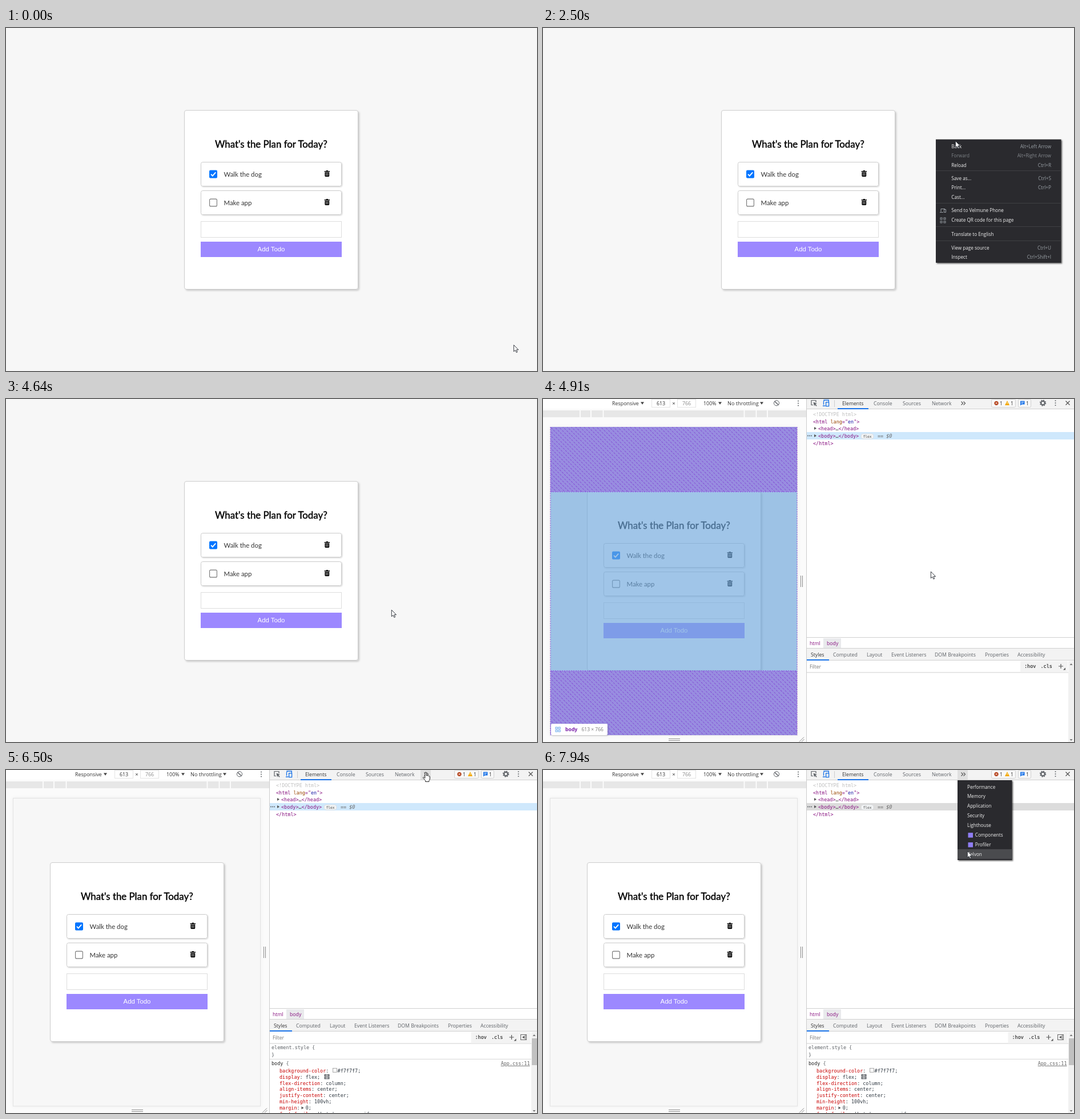
Write an HTML page that moves like this. It is 930 by 602 pixels and loops after 8 s.

```html
<!DOCTYPE html>
<html lang="en">
<head>
<meta charset="utf-8">
<title>Todo app and inspector</title>
<style>
html, body { margin: 0; width: 100%; height: 100%; overflow: hidden; background: #f7f7f7; }
svg { display: block; width: 930px; height: 602px; }
text { white-space: pre; }
.app { font-family: Lato, sans-serif; }
.ui { font-family: "Open Sans", "Noto Sans", sans-serif; }
.code { font-family: "DejaVu Sans Mono", monospace; font-size: 8.45px; }
</style>
</head>
<body>
<svg id="stage" viewBox="0 0 930 602" xmlns="http://www.w3.org/2000/svg"></svg>
<script>
const LOOP = 8000;
const MENU_IN = 1820, MENU_OUT = 4230, TOOLS_IN = 4780, STYLES_IN = 5120, OVERLAY_OUT = 5410, MORE_IN = 6770;

const rect = (x, y, w, h, fill, more = '') =>
  `<rect x="${x}" y="${y}" width="${w}" height="${h}" fill="${fill}" ${more}/>`;
const path = (d, stroke, more = '') => `<path d="${d}" fill="none" stroke="${stroke}" ${more}/>`;
const fillPath = (d, fill, more = '') => `<path d="${d}" fill="${fill}" ${more}/>`;
const label = (x, y, s, size, fill, more = '') =>
  `<text class="ui" x="${x}" y="${y}" font-size="${size}" fill="${fill}" ${more}>${s}</text>`;
const esc = s => s.replace(/</g, '&lt;').replace(/>/g, '&gt;');
// parts: text, colour, text, colour ...
const code = (x, y, ...parts) => {
  let s = '';
  for (let i = 0; i < parts.length; i += 2) s += `<tspan fill="${parts[i + 1]}">${esc(parts[i])}</tspan>`;
  return `<text class="code" x="${x}" y="${y}">${s}</text>`;
};
const group = (id, body, more = '') => `<g id="${id}" ${more}>${body}</g>`;
const END = 'text-anchor="end"', MID = 'text-anchor="middle"';

function trash(x, y) {
  return fillPath(`M${x} ${y + 1}h3v-1h3.4v1h3v1.6h-9.4z`, '#000') +
    fillPath(`M${x + .8} ${y + 3.2}h7.8v6.4q0 1.4-1.4 1.4h-5q-1.4 0-1.4-1.4z`, '#000') +
    path(`M${x + 2.9} ${y + 4.4}v5M${x + 4.7} ${y + 4.4}v5M${x + 6.5} ${y + 4.4}v5`, '#fff', 'stroke-width=".6"');
}

function todo(y, name, done) {
  const box = done
    ? rect(356, y + 14.5, 14, 14, '#0075ff', 'rx="2"') +
      path(`M359 ${y + 21.7}l2.8 2.8 5.4-6.2`, '#fff', 'stroke-width="1.9"')
    : rect(356.6, y + 15.1, 12.8, 12.8, '#fff', 'rx="2" stroke="#767676" stroke-width="1.1"');
  return rect(341.5, y + .5, 246, 42, '#fff', 'rx="3" stroke="#ccc" filter="url(#soft)"') + box +
    `<text class="app" x="381.5" y="${y + 26.4}" font-size="11.4" fill="#333">${name}</text>` +
    trash(557.6, y + 15);
}

const app =
  rect(312.5, 144.5, 304, 314, '#fff', 'rx="3.5" stroke="#ccc" filter="url(#shade)"') +
  `<text class="app" x="464.3" y="210.4" font-size="16.85" fill="#000" stroke="#000" stroke-width=".4" ${MID}>What's the Plan for Today?</text>` +
  todo(235, 'Walk the dog', true) + todo(285, 'Make app', false) +
  rect(341.5, 339.5, 246, 28, '#fff', 'stroke="#ddd"') +
  rect(341, 375, 247, 27, '#9c88ff') +
  `<text x="464.5" y="391.5" font-family="Liberation Sans, Arial, sans-serif" font-size="11.4" fill="#fff" ${MID}>Add Todo</text>`;

// Page menu: top, height, name, shortcut, disabled
const pageRows = [
  [199, 17, 'Back', 'Alt+Left Arrow'], [216, 16, 'Forward', 'Alt+Right Arrow', true], [232, 17, 'Reload', 'Ctrl+R'],
  [256, 16, 'Save as...', 'Ctrl+S'], [272, 16, 'Print...', 'Ctrl+P'], [288, 17, 'Cast...', ''],
  [312, 16, 'Send to Velmune Phone', ''], [328, 18, 'Create QR code for this page', ''],
  [353, 17, 'Translate to English', ''], [378, 16, 'View page source', 'Ctrl+U'], [394, 16, 'Inspect', 'Ctrl+Shift+I']
];

function pageMenu() {
  const grid = [[696, 333], [702, 333], [696, 339], [702, 339]]
    .map(([x, y]) => rect(x, y, 3, 3, 'none', 'stroke="#9aa0a6" stroke-width=".9"')).join('');
  return rect(688, 195.5, 219.5, 216.5, '#292a2d', 'filter="url(#drop)"') +
    rect(688, 0, 219.5, 16, '#4a4b4e', 'id="pageHover"') +
    [250.5, 307.5, 348.5, 373.5].map(y => rect(688, y - .5, 219.5, 1, '#3f4043')).join('') +
    pageRows.map(([y, h, name, keys, off]) => {
      const base = y + h / 2 + 3;
      return label(715.3, base, name, 8.2, off ? '#7c8085' : '#f1f1f1') +
        label(890, base, keys, 8.2, off ? '#85898e' : '#9aa0a6', END);
    }).join('') +
    path('M697 322.5v-5h7M695 323.5h6M702.5 318.5h3v5h-3z', '#9aa0a6') + grid;
}

// Tab overflow menu
const moreRows = ['Performance', 'Memory', 'Application', 'Security', 'Lighthouse', 'Components', 'Profiler', 'Belvon'];
function moreMenu() {
  return rect(726, 18, 95.5, 140, '#292a2d', 'filter="url(#drop)"') +
    rect(726, 0, 95.5, 17, '#4a4b4e', 'id="moreHover"') +
    moreRows.map((s, i) => {
      const y = 32.5 + 16.93 * i, icon = i === 5 || i === 6;
      return (icon ? rect(744.5, y - 7, 8.5, 8.5, '#8f7df2') : '') + label(icon ? 756.8 : 743, y, s, 8.15, '#f1f1f1');
    }).join('');
}

const TAG = '#881280', GREY = '#5f6368', DARK = '#333';
const caret = (x, y) => fillPath(`M${x} ${y}h6l-3 4.5z`, '#444');
const tri = (x, y) => fillPath(`M${x} ${y}v5l4-2.5z`, '#555');
const dots = (x, y, dx, dy, r) =>
  [-1, 0, 1].map(i => `<circle cx="${x + i * dx}" cy="${y + i * dy}" r="${r}" fill="${GREY}"/>`).join('');

function deviceBar() {
  return rect(0, 0, 461, 602, '#fbfbfb') + rect(0, 0, 461, 17, '#fff') +
    label(121, 11, 'Responsive', 8.9, DARK) + caret(171, 5.3) +
    rect(190.5, .5, 32, 14, '#fff', 'stroke="#e4e4e4"') + label(206.5, 11, '613', 8.9, DARK, MID) +
    label(229, 11.3, '×', 9.5, DARK, MID) +
    rect(235.5, .5, 32, 14, '#fff', 'stroke="#e4e4e4"') + label(251.5, 11, '766', 8.9, '#888', MID) +
    label(281, 11, '100%', 8.9, DARK) + caret(307, 5.3) +
    label(323, 11, 'No throttling', 9.2, DARK) + caret(380, 5.3) +
    '<circle cx="409" cy="7.2" r="4.6" fill="none" stroke="#5f6368"/>' + path('M405.5 4l7 6.5', GREY, 'stroke-width="1.6"') + dots(447, 7.5, 0, 4, 1) +
    rect(0, 20, 461, 12, '#e7e7e7') + path('M65 20v12M84 20v12M105.5 20v12M352.5 20v12M373.5 20v12M393 20v12', '#fff', 'stroke-width="1.6"') +
    rect(12.5, 49.5, 433, 540.5, '#f7f7f7', 'stroke="#e2e2e2" filter="url(#glow)"') +
    path('M451.5 310v20M454.5 310v20M220 596.5h20M220 599.5h20', '#8b8b8b') +
    path('M449 601.5l8-8M453 601.5l4.5-4.5', '#8b8b8b');
}

function panel() {
  const tabs = [[524, 'Elements'], [579, 'Console'], [630, 'Sources'], [681, 'Network']];
  const side = [[469, 'Styles'], [508, 'Computed'], [567, 'Layout'], [610, 'Event Listeners'],
    [686, 'DOM Breakpoints'], [774, 'Properties'], [831, 'Accessibility']];
  return rect(461, 0, 469, 602, '#fff') + rect(461, 0, 1, 602, '#ccc') + rect(462, 0, 468, 17, '#f3f3f3') +
    rect(462, 17, 468, 1, '#d0d0d0') +
    path('M478 6v-3.5h-8v8h3', GREY, 'stroke-width="1.2"') + fillPath('M473.5 5.5l6.5 2.6-2.7 1 2.4 2.6-1 1-2.6-2.5-1 2.4z', GREY) +
    path('M492 4v-2h8.3v3M490 12h4.5M491.5 10v-6', '#1a73e8', 'stroke-width="1.3"') +
    rect(495.6, 5.6, 5, 7, '#f3f3f3', 'stroke="#1a73e8" stroke-width="1.3"') + rect(510, 2, 1, 12, '#ccc') +
    tabs.map(([x, s], i) => label(x, 11, s, 8.7, i ? GREY : DARK)).join('') + rect(516, 16, 54, 2, '#1a73e8') +
    rect(726, 0, 18, 17, '#e0e0e0', 'id="moreTab"') + path('M732.5 4.5l3 3-3 3M736.5 4.5l3 3-3 3', '#555', 'stroke-width="1.2"') +
    rect(785.5, .5, 42, 14, '#f8f8f8', 'rx="2" stroke="#d0d0d0"') +
    '<circle cx="794" cy="7.3" r="3.6" fill="#b5421c"/>' + path('M792.5 5.8l3 3M795.5 5.8l-3 3', '#fff', 'stroke-width=".9"') +
    label(800, 11, '1', 8.7, DARK) + fillPath('M813 3l4 8h-8z', '#f2a600') + rect(812.6, 5.5, .9, 3, '#fff') + label(819, 11, '1', 8.7, DARK) +
    rect(832.5, .5, 22, 14, '#f8f8f8', 'rx="2" stroke="#d0d0d0"') + fillPath('M836 3.5h7.5v6h-5l-2.5 2z', '#1a73e8') +
    path('M837.5 5.5h4.5M837.5 7.5h3', '#fff', 'stroke-width=".8"') + label(846, 11, '1', 8.7, DARK) +
    '<circle cx="875.5" cy="7" r="3.3" fill="none" stroke="#5f6368" stroke-width="2.2"/>' +
    '<circle cx="875.5" cy="7" r="4.9" fill="none" stroke="#5f6368" stroke-width="1.5" stroke-dasharray="2 1.85"/>' +
    dots(897.5, 7, 0, 4, 1) + path('M915.5 3.5l7 7M922.5 3.5l-7 7', '#555', 'stroke-width="1.3"') +
    // element tree
    rect(462, 58, 468, 13, '#cfe8fc', 'id="row"') +
    code(473, 30, '<!DOCTYPE html>', '#c0c0c0') +
    code(473, 42.5, '<html ', TAG, 'lang', '#994500', '="', TAG, 'en', '#1a1aa6', '">', TAG) +
    tri(475, 49) + code(482, 55, '<head>', TAG, '…', DARK, '</head>', TAG) +
    dots(467, 64.5, 3, 0, 1) + tri(475, 62) + code(482, 68, '<body>', TAG, '…', DARK, '</body>', TAG) +
    rect(557, 61, 22, 9, '#f1f3f4', 'rx="4" stroke="#d5d7da" stroke-width=".6"') +
    `<text x="568" y="67.6" font-size="6.2" font-family="DejaVu Sans Mono, monospace" fill="#444" ${MID}>flex</text>` +
    `<text class="code" x="586" y="68" font-style="italic" fill="#666">== $0</text>` +
    code(473, 80.5, '</html>', TAG) +
    // breadcrumbs and sidebar tabs
    rect(462, 418, 468, 1, '#d0d0d0') + label(467, 431.5, 'html', 8.7, TAG) +
    rect(491, 420, 31, 17, '#e9eaec') + label(497, 431.5, 'body', 8.7, TAG) +
    rect(462, 437, 468, 22, '#f3f3f3') + rect(462, 437, 468, 1, '#d0d0d0') + rect(462, 458, 468, 1, '#d0d0d0') +
    side.map(([x, s], i) => label(x, 452, s, 8.7, i ? GREY : DARK)).join('') + rect(462, 457, 39, 2, '#1a73e8') +
    rect(462, 479.5, 458, 1, '#d0d0d0') + label(467, 472.8, 'Filter', 8.5, '#777') +
    rect(920, 460, 10, 142, '#f1f1f1') + fillPath('M922.5 467h5l-2.5-3z', '#777') + fillPath('M922.5 597h5l-2.5 3z', '#777') +
    group('bar', rect(836, 460, 83, 19.5, '#f3f3f3') +
      `<text class="code" x="843" y="472" fill="#333" stroke="#333" stroke-width=".2">:hov</text>` +
      `<text class="code" x="871.5" y="472" fill="#333" stroke="#333" stroke-width=".2">.cls</text>` +
      path('M903 469h8M907 465v8', '#555', 'stroke-width="1.2"') + fillPath('M915 471.5v4h-4z', '#555')) +
    group('styles', styles());
}

function styles() {
  const props = [['background-color', '  #f7f7f7'], ['display', 'flex'], ['flex-direction', 'column'], ['align-items', 'center'],
    ['justify-content', 'center'], ['min-height', '100vh'], ['margin', ' 0'], ['font-family', "'Lato', sans-serif"]];
  return rect(898, 460, 21, 19.5, '#f3f3f3') + rect(901.5, 464.5, 10, 9, 'none', 'stroke="#666"') + fillPath('M908 466.5v5l-4-2.5z', '#555') + path('M909.5 465v8', '#666') +
    rect(921, 471, 9, 47, '#c1c1c1') +
    code(465, 490, 'element.style {', GREY) + code(465, 502.5, '}', GREY) + rect(462, 507, 458, 1, '#d8d8d8') +
    code(465, 518, 'body ', '#222', '{', GREY) +
    `<text class="code" x="917.5" y="518" fill="#666" text-decoration="underline" ${END}>App.css:11</text>` +
    props.map(([name, value], i) => code(479, 530.7 + 10.9 * i, name, '#c80000', ': ' + value + ';', '#303942')).join('') +
    rect(572.5, 523.5, 7, 7, '#f7f7f7', 'stroke="#999" stroke-width=".8"') +
    rect(557.5, 534, 9, 8.5, '#5f6368') + path('M562 534v8.5M557.5 538.2h9M559 536h6M559 540.5h6', '#eee', 'stroke-width=".8"') +
    tri(517.5, 590.5);
}

function overlay() {
  return rect(13, 163, 432, 314, '#6fa8dc', 'opacity=".66"') +
    [[49, 114], [477, 113]].map(([y, h]) => rect(13, y, 432, h, '#988de0') + rect(13, y, 432, h, 'url(#hatch)')).join('') +
    path('M13 163h432M13 477h432M13 49v541M445 49v541', '#8a2be2', 'stroke-dasharray="2 2" stroke-width=".7"') +
    rect(14, 570, 99, 20, '#fff', 'rx="2" filter="url(#soft)"') +
    [[22, 576], [27, 576], [22, 581], [27, 581]].map(([x, y]) => rect(x, y, 3.2, 3, 'none', 'stroke="#5da3ea" stroke-width=".9"')).join('') +
    label(39, 583.3, 'body', 8.7, '#7a1fa8', 'font-weight="700"') + label(67.5, 583.3, '613 × 766', 8.5, '#777');
}

const shadow = (id, d, blur, a) =>
  `<filter id="${id}" x="-10%" y="-10%" width="125%" height="130%"><feDropShadow dx="${d}" dy="${d}" stdDeviation="${blur}" flood-color="#000" flood-opacity="${a}"/></filter>`;

const svg = document.getElementById('stage');
svg.innerHTML = `<defs>${shadow('shade', 2.1, 1.7, .18)}${shadow('soft', 1.1, .9, .18)}${shadow('drop', 1.6, .8, .6)}${shadow('glow', 0, 3, .05)}
  <pattern id="hatch" width="5.2" height="5.7" patternUnits="userSpaceOnUse" patternTransform="rotate(-45)">${rect(0, 0, .75, 3.6, '#7a2fd0', 'opacity=".8"')}</pattern></defs>` +
  rect(0, 0, 930, 602, '#f7f7f7') +
  group('device', deviceBar()) + group('app', app) + group('overlay', overlay()) + group('panel', panel()) +
  group('pageMenu', pageMenu()) + group('moreMenu', moreMenu()) +
  group('cursor',
    fillPath('M.3.3v11.6l2.7-2.4 1.9 4 1.8-.8-1.8-3.9h3.6z', '#fff', 'id="arrow" stroke="#20242c" stroke-width=".9" stroke-linejoin="round"') +
    fillPath('M-1.2 10V1.2Q-1.2 0 0 0t1.2 1.2v4.6q1.4-.9 2.2.3 1.4-.7 2 .5 1.9-.3 1.9 1.3v3.3q0 2-1.4 3.3v2h-6.3v-2l-3.9-4.4q-.8-1.4.8-1.6l2.3 1.8z',
      '#fff', 'id="hand" stroke="#111" stroke-width=".9" stroke-linejoin="round"'));

const el = {};
svg.querySelectorAll('[id]').forEach(n => { el[n.id] = n; });

// Pointer tip: time, x, y
const track = [
  [0, 889, 556], [40, 889, 556], [810, 689, 210], [1090, 688, 195], [2180, 688, 195], [2500, 722, 198], [2990, 735, 248],
  [3270, 741, 344], [3850, 735, 396], [4200, 735, 396], [4640, 675, 370], [4910, 679, 303], [5260, 715, 36],
  [5400, 716, 36], [5760, 719, 8], [6160, 719, 30], [6500, 735, 4], [7200, 735, 4], [7940, 743, 142], [8000, 743, 142]
];

// Monotone cubic between the track points
function tip(t, axis) {
  let i = 0;
  while (i < track.length - 2 && t >= track[i + 1][0]) i++;
  const slope = k => track[k + 1] && track[k] ? (track[k + 1][axis] - track[k][axis]) / (track[k + 1][0] - track[k][0]) : 0;
  const tangent = k => { const a = slope(k - 1), b = slope(k); return a * b > 0 ? 2 * a * b / (a + b) : 0; };
  const a = track[i], b = track[i + 1], h = b[0] - a[0], u = (t - a[0]) / h, v = 1 - u;
  return v * v * (1 + 2 * u) * a[axis] + u * u * (3 - 2 * u) * b[axis] + h * u * v * (v * tangent(i) - u * tangent(i + 1));
}

const show = (node, on) => node.setAttribute('display', on ? 'inline' : 'none');
function place(node, on, y, h) {
  show(node, on);
  if (on) { node.setAttribute('y', y); node.setAttribute('height', h); }
}

function draw(t) {
  const x = tip(t, 1), y = tip(t, 2);
  const tools = t >= TOOLS_IN, more = t >= MORE_IN, loaded = t >= STYLES_IN;
  el.app.setAttribute('transform', tools ? 'translate(-235 18)' : '');
  show(el.device, tools);
  show(el.panel, tools);
  show(el.overlay, tools && t < OVERLAY_OUT);
  show(el.styles, loaded);
  el.bar.setAttribute('transform', loaded ? 'translate(-21.5 0)' : '');
  el.row.setAttribute('fill', more ? '#dcdcdc' : '#cfe8fc');

  show(el.pageMenu, t >= MENU_IN && t < MENU_OUT);
  el.pageMenu.setAttribute('opacity', t < MENU_IN + 70 ? .6 : 1);
  const hit = pageRows.find(r => !r[4] && y >= r[0] && y < r[0] + r[1]);
  place(el.pageHover, !!hit, ...(hit || []));

  show(el.moreMenu, more);
  el.moreMenu.setAttribute('opacity', t < MORE_IN + 70 ? .6 : 1);
  const n = Math.floor((y - 21) / 16.93);
  place(el.moreHover, n >= 0 && n < moreRows.length, Math.floor(21 + 16.93 * n), 17);

  const over = tools && x >= 726 && y < 17;
  show(el.moreTab, over || more);
  const hand = over && !more;
  show(el.hand, hand);
  show(el.arrow, !hand);
  el.cursor.setAttribute('transform', `translate(${x.toFixed(2)} ${y.toFixed(2)})`);
}

const start = performance.now();
function tick() {
  draw((performance.now() - start) % LOOP);
  requestAnimationFrame(tick);
}
tick();
</script>
</body>
</html>
```
